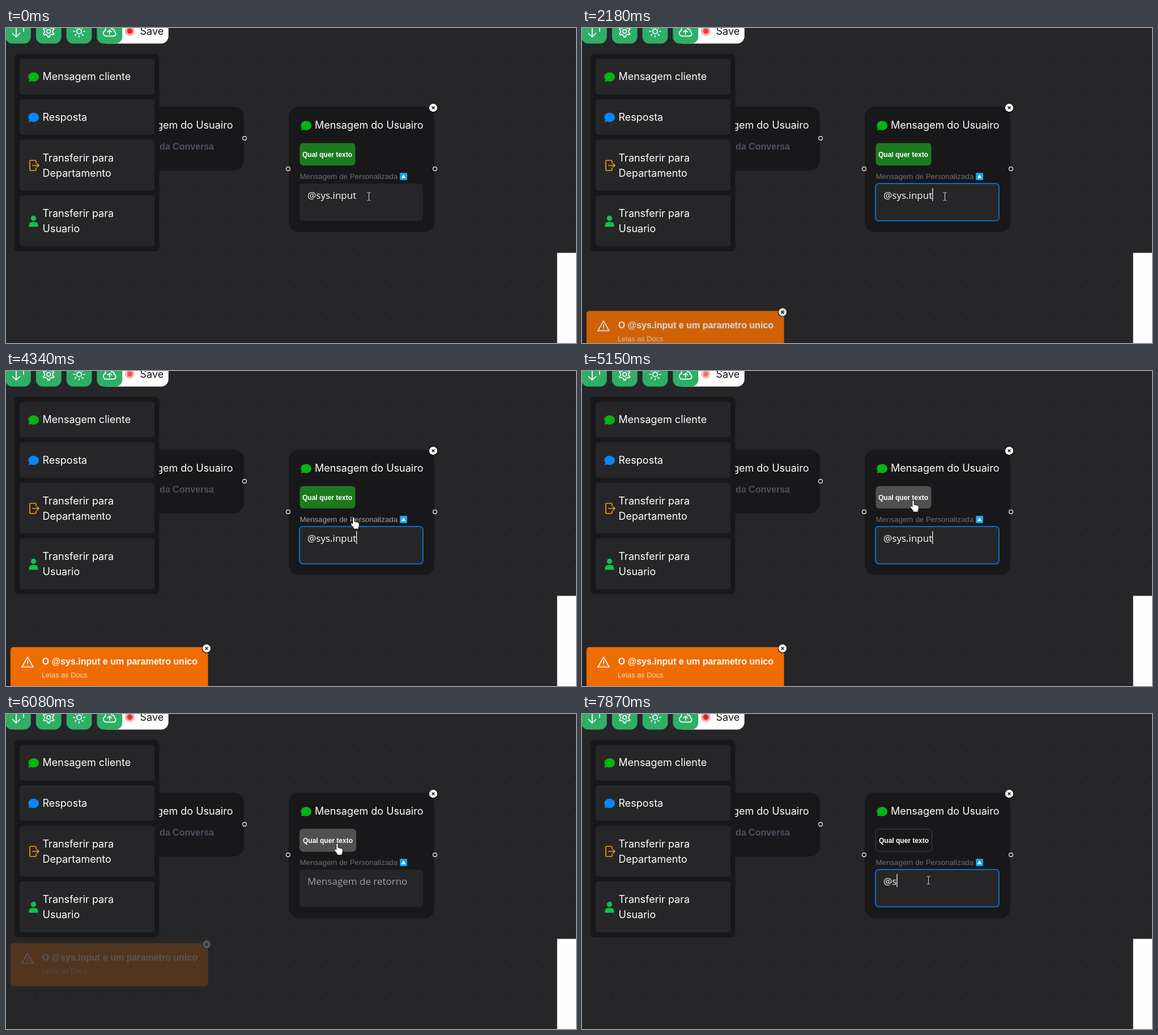
Recreate the animation shown at these times as an HTML page. Size 1006 by 557 pixels, loop 7.99 s.

```html
<!DOCTYPE html>
<html lang="pt">
<head>
<meta charset="utf-8">
<title>Editor de fluxo</title>
<style>
  html, body { margin: 0; width: 100%; height: 100%; overflow: hidden; background: #262628; }
  svg { display: block; width: 1006px; height: 557px; }
  text { white-space: pre; }
  .ui { font: 400 18px Inter, sans-serif; fill: #fff; }
  .sans { font-family: "Liberation Sans", Arial, sans-serif; }
  .bold { font-weight: 700; }
  .field { font: 17px "Open Sans", sans-serif; }
  .line { fill: none; stroke: #fff; stroke-width: 1.7; stroke-linecap: round; stroke-linejoin: round; }
  .handle { fill: #18181a; stroke: #fff; stroke-width: 1.2; }
</style>
</head>
<body>
<svg viewBox="0 0 1006 557">
  <defs>
    <pattern id="grid" width="56" height="56" x="24" y="27.5" patternUnits="userSpaceOnUse">
      <circle cx="28" cy="28" r="1" fill="#0e0e0f"/>
    </pattern>
    <path id="bubble" d="M0-8.3C5.3-8.3 9.4-4.7 9.4 0S5.3 8.2 0 8.2c-1.6 0-3-.3-4.300-.9L-9 8.500l1.300-4.300A8 8 0 0 1-9.400 0C-9.400-4.700-5.300-8.300 0-8.300z"/>
    <g id="close">
      <circle r="7.800" fill="#fff" stroke="#0c0c0d" stroke-width="1.2"/>
      <path d="M-2.300-2.300l4.600 4.600M2.300-2.300l-4.600 4.600" stroke="#111" stroke-width="1.600"/>
    </g>
  </defs>

  <rect width="1006" height="557" fill="#262628"/>
  <rect width="1006" height="557" fill="url(#grid)"/>

  <!-- first node -->
  <rect x="163" y="139" width="257" height="113" rx="18" fill="#18181a"/>
  <text class="ui" x="400.500" y="178" text-anchor="end">Mensagem do Usuairo</text>
  <text class="sans bold" x="367" y="215" font-size="16" fill="#4b5260" text-anchor="end">da Conversa</text>
  <circle class="handle" cx="421" cy="195" r="3.400"/>

  <!-- second node -->
  <rect x="499" y="139" width="257" height="222" rx="18" fill="#18181a"/>
  <use href="#bubble" x="529.700" y="172.500" fill="#06b312"/>
  <text class="ui" x="736.500" y="178" text-anchor="end">Mensagem do Usuairo</text>
  <rect id="button" x="518.500" y="203.500" height="39.500" rx="6"/>
  <text id="buttonText" class="sans bold" y="228" font-size="12" fill="#fff">Qual quer texto</text>
  <text id="label" class="sans" x="518.500" y="267" font-size="13.333">Mensagem de Personalizada</text>
  <rect x="695" y="256" width="13" height="13" rx="1.500" fill="#12a5ea"/>
  <path d="M701.500 259l4 6.500h-8z" fill="#fff"/>
  <rect id="area" x="518" y="275" width="218" height="66" rx="6" fill="#262628" stroke="#1068c4"/>
  <text id="value" class="field" x="532" y="302"></text>
  <rect id="caret" y="283" width="1.200" height="23" fill="#fff"/>
  <circle class="handle" cx="498" cy="249" r="3.400"/>
  <circle class="handle" cx="757" cy="249" r="3.400"/>
  <use href="#close" x="754" y="141"/>

  <!-- side panel -->
  <rect x="15" y="45.500" width="255.500" height="349.500" rx="7" fill="#18181a"/>
  <g fill="#262628">
    <rect x="24" y="54.500" width="238" height="63" rx="5"/>
    <rect x="24" y="126" width="238" height="63" rx="5"/>
    <rect x="24" y="197.500" width="238" height="90" rx="5"/>
    <rect x="24" y="296" width="238" height="90" rx="5"/>
  </g>
  <g class="ui">
    <text x="64.500" y="92">Mensagem cliente</text>
    <text x="64.500" y="164">Resposta</text>
    <text x="64.500" y="235.500">Transferir para</text>
    <text x="64.500" y="262.500">Departamento</text>
    <text x="64.500" y="334">Transferir para</text>
    <text x="64.500" y="361">Usuario</text>
  </g>
  <use href="#bubble" x="48.700" y="86.500" fill="#06b312"/>
  <use href="#bubble" x="48.700" y="158" fill="#0a84ff"/>
  <path class="line" style="stroke:#f59e0b" d="M53 238.500V236q0-2-2-2h-7q-2 0-2 2v14q0 2 2 2h7q2 0 2-2v-2.500M47 243h11M55 240l3 3-3 3"/>
  <g fill="#16bf4f">
    <circle cx="48.500" cy="336.500" r="4.700"/>
    <path d="M40.500 351.500v-2.500q0-6 6-6h4q6 0 6 6v2.500z"/>
  </g>

  <!-- toolbar -->
  <rect x="165" y="-17.200" width="121.700" height="44.800" rx="13" fill="#fff"/>
  <g fill="#2fae67">
    <rect x="-.9" y="-17.200" width="44.800" height="44.800" rx="12"/>
    <rect x="52.900" y="-17.200" width="44.800" height="44.800" rx="12"/>
    <rect x="106.700" y="-17.200" width="44.800" height="44.800" rx="12"/>
    <rect x="160.400" y="-17.200" width="44.800" height="44.800" rx="12"/>
  </g>
  <path class="line" d="M18-4V16M11.500 9.500L18 16l6.500-6.500M31-3V6"/>
  <path id="gear" class="line"/>
  <circle class="line" cx="75.300" cy="6" r="3.400"/>
  <circle class="line" cx="129" cy="6" r="4.200"/>
  <path id="rays" class="line"/>
  <path class="line" style="stroke-width:1.5" transform="translate(169.400 -7.400) scale(1.12)"
    d="M12 16.500V9.750m0 0l3 3m-3-3l-3 3M6.750 19.500a4.500 4.500 0 0 1-1.410-8.775 5.250 5.250 0 0 1 10.233-2.330 3 3 0 0 1 3.758 3.848A3.752 3.752 0 0 1 18 19.500z"/>
  <g id="record">
    <circle cx="218.500" cy="5.500" r="8.500" fill="#fca5a5"/>
    <circle cx="218.500" cy="5.500" r="4.800" fill="#dc2626"/>
  </g>
  <text x="236.500" y="12" font-family="Inter, sans-serif" font-size="18" fill="#111">Save</text>

  <rect x="972.700" y="397.600" width="34" height="160" fill="#fdfdfd"/>

  <g id="toast">
    <rect x="8" y="488.300" width="348.600" height="76" rx="5" fill="#ef6c00"/>
    <path class="line" d="M38 506l10 17.500H28zM38 512.500v5M38 520.300v.2"/>
    <text class="sans bold" x="63.700" y="519" font-size="16" fill="#fff">O @sys.input e um parametro unico</text>
    <text class="sans" x="63" y="542" font-size="12.800" fill="#fbd9bd">Leias as Docs</text>
    <use href="#close" x="354" y="490.500"/>
  </g>

  <path id="beam" fill="none" stroke="#d8d8d8" d="M-2.500-7H-.5L.5-6l1-1h2M.5-6V6M-2.500 7H-.5L.5 6l1 1h2"/>
  <path id="hand" fill="#fff" stroke="#111" stroke-width="1" stroke-linejoin="round"
    d="M-4.200-7.500a1.700 1.700 0 0 1 3.400 0V-1.700L5.300-.4q2 .5 2 2.300V4.800q0 2-1.200 4V11.300H-2.700V9.300L-7 3.800q-1.300-2.500.4-3 1.200-.2 2.400 1.500z"/>
</svg>
<script>
const LOOP = 7990;
const $ = id => document.getElementById(id);
const set = (id, attrs) => {
  for (const name in attrs) $(id).setAttribute(name, attrs[name]);
};

// Toolbar icons built around a centre
const polar = (cx, cy, r, a) => `${(cx + r * Math.cos(a)).toFixed(2)} ${(cy + r * Math.sin(a)).toFixed(2)}`;
const around = n => Array.from({ length: n }, (_, i) => (i + .5) * 2 * Math.PI / n);
set('gear', {
  d: 'M' + around(6).flatMap(a =>
    [[7.6, -.24], [10.2, -.13], [10.2, .13], [7.6, .24]].map(([r, da]) => polar(75.3, 6, r, a + da))).join('L') + 'z'
});
set('rays', {
  d: around(8).map(a => a + Math.PI / 8).map(a => `M${polar(129, 6, 7.6, a)}L${polar(129, 6, 10.1, a)}`).join('')
});

const ticks = [
  [0, 0, 1], [300, 300, 1], [450, 570, 2], [820, 820, 1], [1250, 1370, 2], [1520, 1520, 1],
  [1670, 1670, 1], [2050, 2310, 3], [2460, 2580, 2], [3140, 3500, 4], [3650, 3650, 1],
  [4090, 4340, 3], [4490, 4490, 1], [4640, 4640, 1], [5150, 5670, 5], [5810, 5810, 1],
  [6080, 6700, 6], [6970, 6970, 1], [7120, 7600, 5], [7870, 7870, 1]
].flatMap(([from, to, n]) =>
  Array.from({ length: n }, (_, i) => n > 1 ? from + (to - from) * i / (n - 1) : from));

const caretToggles = [1520, 2580, 3140, 3650, 4215, 4640, 5150, 5670, 6570, 7120, 7600];
const pointer = [
  [0, 'beam', 640, 298], [4090, 'beam', 632, 288], [4215, 'hand', 620, 272], [4340, 'hand', 616, 268],
  [4490, 'hand', 591, 243], [4640, 'hand', 587, 238], [6200, 'hand', 598, 268],
  [6320, 'beam', 607, 287], [6450, 'beam', 611, 294]
];
const within = (t, from, to) => t >= from && t < to;

function drawButton(t) {
  const hover = within(t, 4490, 6200), picked = t < 6080;
  set('button', {
    width: picked ? 98 : 99,
    fill: hover ? '#505051' : picked ? '#1e7a1e' : '#18181a',
    stroke: picked ? 'none' : hover ? '#5a5a5c' : '#434347'
  });
  set('buttonText', { x: picked ? 523 : 524 });
}

function drawField(t) {
  const typed = t < 6080 ? '@sys.input' : t < 7600 ? '' : t < 7870 ? '@' : '@s';
  const focused = within(t, 1520, 5810) || t >= 6570;
  $('value').textContent = typed || 'Mensagem de retorno';
  set('value', { fill: typed ? '#fff' : '#a0a0a2' });
  set('area', { 'stroke-width': focused ? 2 : 0 });
  set('caret', {
    x: 532 + (typed ? $('value').getComputedTextLength() : 0),
    opacity: caretToggles.filter(at => at <= t).length % 2
  });
}

function drawToast(t) {
  let shift = 0, opacity = 0;
  if (within(t, 2050, 6080)) {
    const left = Math.max(0, 1 - (t - 1950) / 500) ** 3;
    shift = 76 * left;
    opacity = 1 - left;
  } else if (within(t, 6080, 6300)) {
    const gone = (t - 6080) / 220;
    shift = -83 - 20 * gone;
    opacity = .22 * (1 - gone);
  }
  set('toast', { transform: `translate(0 ${shift})`, opacity });
}

function drawPointer(t) {
  const [, kind, x, y] = pointer.findLast(([at]) => at <= t);
  for (const id of ['beam', 'hand']) {
    set(id, { opacity: id === kind ? 1 : 0, transform: `translate(${x} ${y})` });
  }
}

function draw(now) {
  const t = ticks.findLast(at => at <= now % LOOP) ?? 0;
  set('record', { opacity: .76 + .24 * Math.cos((t - 5840) / 1000 * Math.PI) });
  set('label', { fill: within(t, 4215, 4490) || within(t, 6200, 6320) ? '#a3a3a8' : '#707075' });
  drawButton(t);
  drawField(t);
  drawToast(t);
  drawPointer(t);
}

const start = performance.now();
function frame() {
  draw(performance.now() - start);
  requestAnimationFrame(frame);
}
frame();
</script>
</body>
</html>
```
